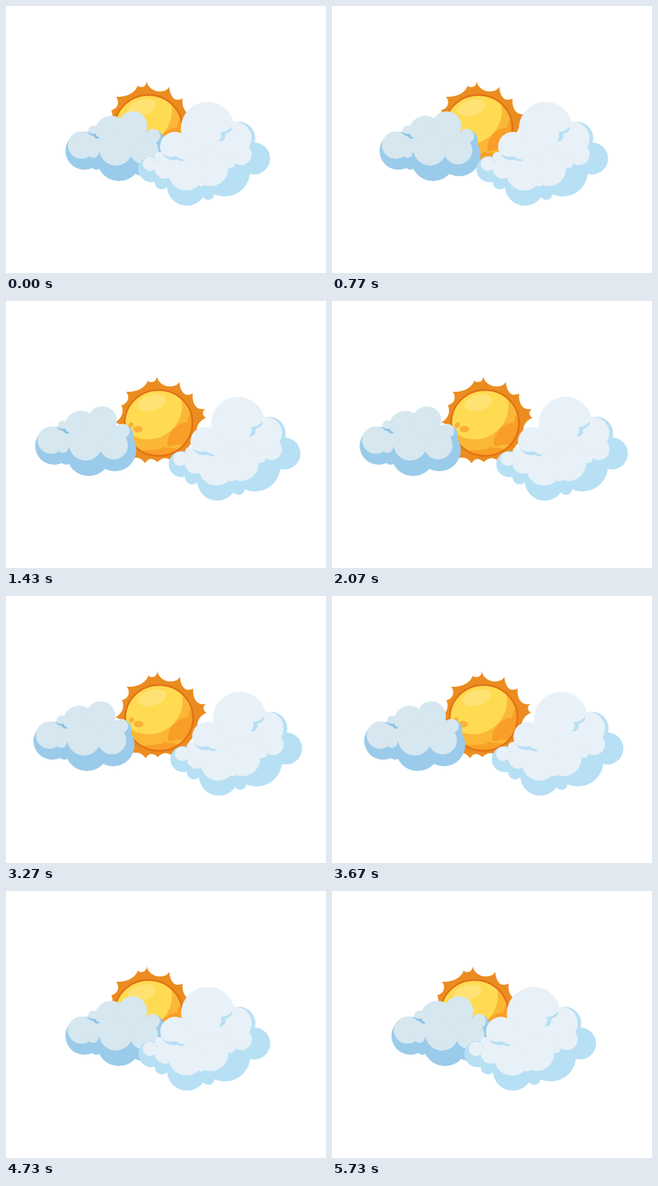
An HTML page that plays this animation: 538 px wide and 450 px high, repeating every 5.76 s.

```html
<!DOCTYPE html>
<html lang="en">
<head>
<meta charset="utf-8">
<title>Sun and clouds</title>
<style>
  html, body { margin: 0; width: 100%; height: 100%; overflow: hidden; background: #fff; }
  svg { display: block; width: 538px; height: 450px; }

  /* Soft start, small overshoot, slow settle */
  .drift {
    animation: drift 5760ms infinite;
    animation-timing-function: linear(0, .008 4%, .03 8%, .08 12.8%, .148 17.6%, .25 24%,
      .372 30.8%, .5 36%, .745 48%, .944 57.2%, .995 60%, 1.02 63%, 1.028 66%, 1.01 72%,
      .995 78%, .99 84%, .998 92%, 1);
  }
  @keyframes drift {
    0%, 99.48%, 100% { transform: translateX(0); }
    43.4%, 56.08% { transform: translateX(var(--shift)); }
  }
  #sun { --shift: 18px; }
  #left { --shift: -54px; }
  #right { --shift: 54px; }
</style>
</head>
<body>
<svg viewBox="0 0 538 450">
  <defs>
    <clipPath id="disc"><ellipse cx="257.5" cy="205.5" rx="57" ry="55.5"/></clipPath>
  </defs>

  <g id="sun" class="drift">
    <g transform="translate(-18 0)">
      <path fill="#eb8c20" d="M254.5 127.5C257 138 267 144 276 144S290 141 292.5 136
        C293 148 299 159 307 158Q311 158 315 156C313 168 319 180 326 181.5Q331 183 336 182
        C330 187 331 192 337 197C326 201 320 212 322 222Q324 230 329 236Q313 236 308 246Q304 253 305 259
        Q285 254 277 268Q267 260 255.5 271.5Q242 260 235 273.5Q228 263 217 264Q207 264 200 262
        Q208 250 203 241Q198 235 190 233Q202 219 196 211Q191 206 184 205C195 198 200 188 195 175.5
        C206 173 210 162 203 153C220 154 235 147 239.5 134C242 138 248 137 251 135Q254 132 254.5 127.5Z"/>
      <g clip-path="url(#disc)">
        <rect x="195" y="145" width="125" height="120" fill="#fbb736"/>
        <circle cx="240" cy="176" r="57" fill="#ffdb52"/>
        <ellipse cx="246" cy="171.500" rx="24.500" ry="13" transform="rotate(-16 246 171.500)" fill="#ffe273"/>
        <path fill="#f99e27" d="M320 188Q306 190 306 205C288 205 272 223 272 242Q274 247 283 243Q292 241 300 242L320 230Z"/>
        <path fill="#f99e27" d="M218 251Q243 253 262 249Q267 243 271 248Q281 246 290 250L270 265H235Z"/>
        <ellipse cx="223" cy="216" rx="8" ry="5.500" fill="#fbb03a"/>
        <ellipse cx="211" cy="209" rx="4" ry="5" transform="rotate(35 211 209)" fill="#fbb03a"/>
      </g>
      <ellipse cx="257.500" cy="205.500" rx="57" ry="55.500" fill="none" stroke="#e37214" stroke-width="3"/>
    </g>
  </g>

  <g id="left" class="drift">
    <g fill="#9bcbea">
      <path d="M132 244L152 267 190 270 234 260 247 226 180 225Z"/>
      <circle cx="132" cy="244" r="32"/>
      <circle cx="152" cy="267" r="9"/>
      <circle cx="190" cy="258" r="37"/>
      <circle cx="234" cy="251" r="36"/>
      <circle cx="247" cy="226" r="18"/>
    </g>
    <g fill="#d6e7f0">
      <path d="M127 234L146 247 185 245 232 245 247 219 213 200 176 205 147 214Z"/>
      <circle cx="127" cy="234.500" r="23"/>
      <circle cx="147" cy="247" r="9"/>
      <circle cx="177" cy="213" r="28"/>
      <circle cx="213" cy="202" r="24.500"/>
      <circle cx="247" cy="219" r="12"/>
      <circle cx="185" cy="241" r="28"/>
      <circle cx="232" cy="243" r="24"/>
      <circle cx="147" cy="210" r="8.500"/>
    </g>
    <path fill="#8cc3e4" d="M138 211Q142 217 151 215Q151 220 158 222Q152 226 147 219Q139 218 138 211Z"/>
  </g>

  <g id="right" class="drift">
    <g fill="#b7e0f5">
      <path d="M245 275L262 297 304 315 340 318 368 290 417 257 391 223 300 230Z"/>
      <circle cx="244.500" cy="275" r="22"/>
      <circle cx="262" cy="297" r="12"/>
      <circle cx="304" cy="303" r="33.500"/>
      <circle cx="340" cy="317" r="10"/>
      <circle cx="367.500" cy="278" r="43"/>
      <circle cx="417" cy="257" r="27"/>
      <circle cx="391" cy="223" r="28"/>
    </g>
    <g fill="#e8f1f7">
      <path d="M258 256L267 270 302 285 344 280 395 250 385 223 338 190 285 236Z"/>
      <circle cx="339" cy="206.500" r="45"/>
      <circle cx="385" cy="223" r="28"/>
      <circle cx="395" cy="250" r="18"/>
      <circle cx="377" cy="265" r="8"/>
      <circle cx="344" cy="274" r="29.500"/>
      <circle cx="328" cy="297" r="7"/>
      <circle cx="303" cy="281" r="30"/>
      <circle cx="267" cy="274" r="17"/>
      <circle cx="242" cy="266" r="12"/>
      <circle cx="258" cy="254" r="8"/>
      <circle cx="284" cy="237" r="25"/>
    </g>
    <g fill="#b7e0f5">
      <path d="M262 248Q272 257 286 253Q290 258 301 259Q295 264 288 259Q271 263 262 248Z"/>
      <path d="M380 203Q381 212 369 215Q369 230 357 228Q364 222 361 212Q371 213 380 203Z"/>
    </g>
  </g>
</svg>
</body>
</html>
```
